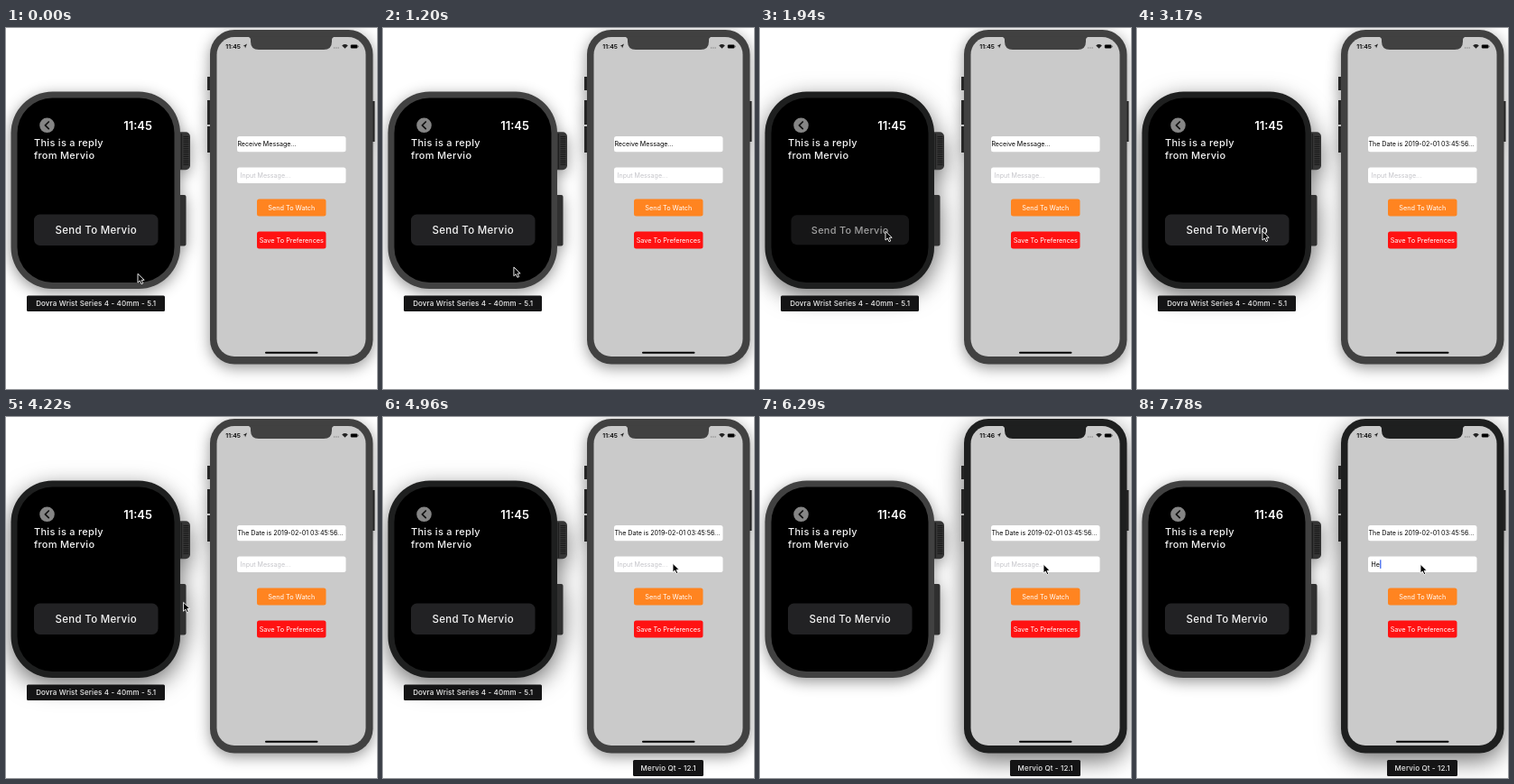
Animation of 411x400 px, one loop 8 s. Source, as an HTML page:

```html
<!DOCTYPE html>
<html lang="en">
<head>
<meta charset="utf-8">
<title>Watch and phone messaging</title>
<style>
  html, body { margin: 0; width: 100%; height: 100%; overflow: hidden; background: #fff; }
  svg { display: block; width: 100vw; height: 100vh; }
  text { font: 7.1px Inter, "Open Sans", sans-serif; white-space: pre; }
  .body { fill: #414141; filter: drop-shadow(0 4px 8px rgba(0, 0, 0, .42)); }
  .focus { fill: #1e1f1f; filter: drop-shadow(0 8px 13px rgba(0, 0, 0, .56)); }
  .tag rect { fill: #141415; }
  .tag text { font-size: 8px; font-weight: 500; letter-spacing: .14px; fill: #eee; text-anchor: middle; }
  .reply { font-size: 11px; font-weight: 500; letter-spacing: .28px; fill: #f4f4f4; }
  .send { font-size: 11.5px; font-weight: 500; letter-spacing: .3px; fill: #f4f4f4; text-anchor: middle; }
  .label { font-size: 7.3px; fill: #fff; text-anchor: middle; }
</style>
</head>
<body>
<svg viewBox="0 0 411 400" preserveAspectRatio="none">
  <g id="watch">
    <g class="body" id="watchBody">
      <rect x="190" y="185" width="9.5" height="56.5" rx="2" fill="#303030"/>
      <rect x="188" y="115.3" width="16" height="42" rx="5" fill="#363636"/>
      <rect x="5.5" y="70.5" width="187.5" height="218.5" rx="46"/>
    </g>
    <path d="M199.5 120V153" stroke="#191919" stroke-width="6" stroke-dasharray="1 1.2"/>
    <path d="M194.3 117V156" stroke="#1a1a1a"/>
    <rect x="12.5" y="77.5" width="174" height="204.5" rx="39"/>
    <circle cx="45.5" cy="107.8" r="8.3" fill="#858585"/>
    <path d="M47.3 104L43.4 107.8L47.3 111.6" fill="none" stroke="#111" stroke-width="1.7" stroke-linecap="round" stroke-linejoin="round"/>
    <text id="watchTime" x="162" y="112.5" text-anchor="end" fill="#fff" style="font-size:13px;font-weight:600"></text>
    <text class="reply" x="31" y="130.6">This is a reply</text>
    <text class="reply" x="31" y="144.8">from Mervio</text>
    <g id="sendBtn">
      <rect x="31" y="206.5" width="137.5" height="34.5" rx="6.5" fill="#222224"/>
      <text class="send" x="99.7" y="228">Send To Mervio</text>
    </g>
  </g>

  <g id="phone">
    <g class="body" id="phoneBody">
      <path d="M223 54h4v15h-4zM223 80h4v27h-4zM223 109h4v29h-4zM404 81h4.5v45h-4.5z" fill="#262626"/>
      <rect x="226" y="2" width="180.5" height="370.5" rx="27"/>
    </g>
    <rect x="233.5" y="10" width="165" height="354" rx="19.5" fill="#cacaca"/>
    <path id="notch" d="M267 9.5Q271 10 271 13V15Q271 24 280 24H352Q361 24 361 15V13Q361 10 365 9.5Z"/>
    <text id="phoneTime" x="243.3" y="22.8" style="font-size:6.8px;font-weight:600"></text>
    <path d="M267 17.6L262.6 20L264.6 20.3L265 22.4Z" fill="#222"/>
    <path d="M363 22h1.2M365.3 22h1.2M367.6 22h1.2" stroke="#777" stroke-width="1.2"/>
    <path d="M372.2 19.4Q375.5 16.8 378.8 19.4L375.5 22.8Z" fill="#222"/>
    <rect x="381.8" y="18.4" width="7.6" height="4.1" rx="1.2"/>
    <path d="M390.1 19.7v1.5" stroke="#222" stroke-width=".7"/>
    <rect x="256" y="120" width="120.5" height="17.2" rx="2.5" fill="#fff"/>
    <text id="received" x="256.4" y="131.2"></text>
    <rect x="256" y="154.5" width="120.5" height="17.5" rx="2.5" fill="#fff"/>
    <text id="input" x="259.6" y="165.7"></text>
    <rect id="caret" y="158.3" width="1.3" height="9.6" fill="#4169ef"/>
    <rect x="278" y="189.6" width="76.5" height="19" rx="2.5" fill="#ff8420"/>
    <text class="label" x="316.3" y="201.7">Send To Watch</text>
    <rect x="278" y="225.5" width="76.5" height="18.9" rx="2.5" fill="#ff1212"/>
    <text class="label" x="316.3" y="237.7">Save To Preferences</text>
    <rect x="287" y="358.8" width="58.5" height="2" rx="1"/>
  </g>

  <g class="tag" id="watchTag">
    <rect x="23" y="296.5" width="153" height="17.5" rx="1.5"/>
    <text x="99.7" y="308.4">Dovra Wrist Series 4 - 40mm - 5.1</text>
  </g>
  <g class="tag" id="phoneTag">
    <rect x="277" y="380" width="78" height="18" rx="1.5"/>
    <text x="316.2" y="392">Mervio Qt - 12.1</text>
  </g>
  <path id="cursor" d="M0 0V9.8L2.3 7.7L4 11.4L5.7 10.6L4.2 7H7.2Z" stroke="#fff" stroke-width=".9" stroke-linejoin="round"/>
</svg>
<script>
const LOOP = 8000;
const $ = id => document.getElementById(id);

// Pointer moves: first step, last step, number of steps, start point, end point
const MOVES = [
  [1200, 1640, 4, [146, 272.3], [139, 225.3]],
  [3920, 4960, 8, [139, 225.3], [321, 162.3]],
  [5110, 6140, 8, [321, 162.3], [314, 163.3]]
];
const CARET = [[0, 0], [6730, 1], [7180, .5], [7330, 0], [7630, 1]];
const TYPED = [[0, ""], [7630, "H"], [7780, "He"]];
const PRESS = [[0, 0], [1940, 1], [2090, .5], [2270, 0]];
const HOVER = [[0, 0], [4512, .5], [4660, 1]];

const at = (steps, t) => steps.reduce((value, [time, next]) => t >= time ? next : value, steps[0][1]);
const ease = p => p * p * (3 - 2 * p);

function pointer(t) {
  let pos = MOVES[0][3];
  for (const [start, end, count, from, to] of MOVES) {
    if (t < start) break;
    const gap = (end - start) / (count - 1);
    const step = Math.min(count, Math.floor((t - start) / gap + 1.001));
    const p = ease(step / count);
    pos = from.map((v, i) => v + (to[i] - v) * p);
  }
  return pos;
}

function render(t) {
  const phoneFocus = t >= 6290;
  const watchFocus = t >= 1940 && !phoneFocus;
  const typed = at(TYPED, t);
  const press = at(PRESS, t);

  $("watchBody").classList.toggle("focus", watchFocus);
  $("phoneBody").classList.toggle("focus", phoneFocus);
  $("notch").setAttribute("fill", phoneFocus ? "#1e1f1f" : "#414141");
  $("watchTime").textContent = $("phoneTime").textContent = t < 5550 ? "11:45" : "11:46";
  $("received").textContent = t < 3170 ? "Receive Message..." : "The Date is 2019-02-01 03:45:56...";

  $("input").textContent = typed || "Input Message...";
  $("input").setAttribute("fill", typed ? "#000" : "#c4c4c9");
  $("caret").setAttribute("x", 259.4 + (typed ? $("input").getComputedTextLength() + .3 : 0));
  $("caret").setAttribute("opacity", at(CARET, t));

  $("sendBtn").setAttribute("transform",
    `translate(99.7 223.7) scale(${1 - .05 * press}) translate(-99.7 -223.7)`);
  $("sendBtn").setAttribute("opacity", 1 - .35 * press);
  $("watchTag").setAttribute("opacity", phoneFocus ? 0 : 1);
  $("phoneTag").setAttribute("opacity", at(HOVER, t));
  $("cursor").setAttribute("transform", `translate(${pointer(t)})`);
}

const begin = performance.now();
function tick() {
  render((performance.now() - begin) % LOOP);
  requestAnimationFrame(tick);
}
tick();
</script>
</body>
</html>
```
